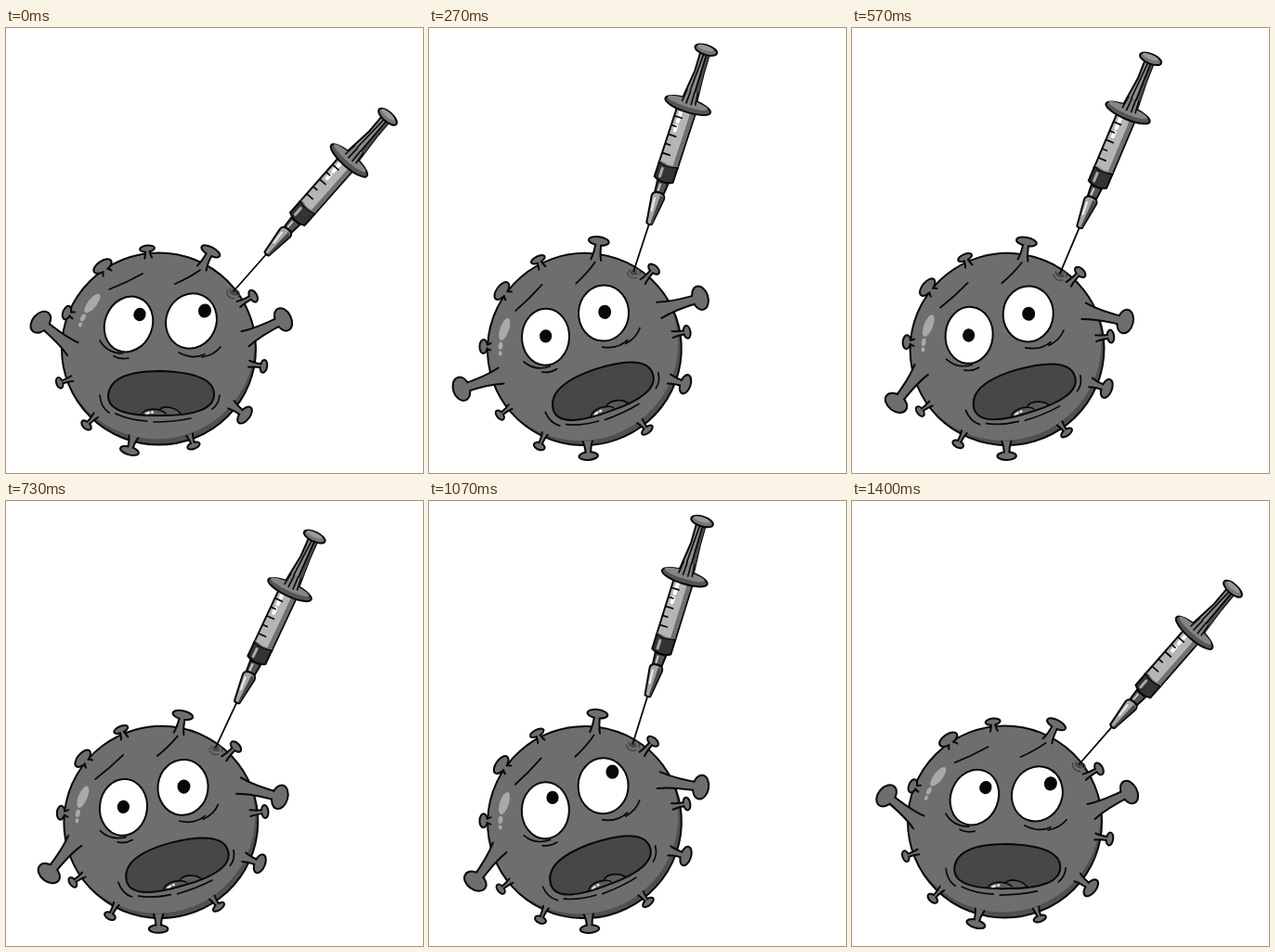
Recreate the animation shown at these times as an HTML page with a canvas. Size 449 by 480 pixels, loop 1.43 s.

```html
<!DOCTYPE html>
<html lang="en">
<head>
<meta charset="utf-8">
<title>Virus and syringe</title>
<style>
  html, body { margin: 0; width: 100%; height: 100%; overflow: hidden; background: #fff; }
  canvas { display: block; }
</style>
</head>
<body>
<canvas id="stage" width="449" height="480"></canvas>
<script>
const ctx = document.getElementById('stage').getContext('2d');
const LOOP = 1430, STEPS = 43, STEP = LOOP / STEPS;
const CX = 164.5, CY = 346;
const SKIN = '#6e6e6e', INK = '#080808';
const rad = deg => deg * Math.PI / 180;

// direction, distance of the head, half width and half thickness of the head
const SPIKES = [
  [-96.6, 108.7, 8, 3.5], [-62, 119, 11, 4.6], [-124.2, 107.6, 11, 5.6],
  [-158.5, 106.4, 7.5, 4.2], [161, 113, 6, 3.4], [133.4, 113.5, 6.3, 3.7],
  [106, 114.4, 10.2, 4.3], [70.3, 111, 7, 3.4], [37.7, 117, 10.5, 5.6],
  [9.5, 114.5, 7, 3.7], [-29.2, 116.5, 7, 4]
];

function ease(x) {
  x = Math.min(1, Math.max(0, x));
  return x * x * x * (10 - 15 * x + 6 * x * x);
}

// Swings out to a peak, relaxes to the middle of the loop, then mirrors back.
function swing(t, peak, middle) {
  const m = Math.min(t, LOOP - t);
  return m < 320 ? peak * ease(m / 320)
                 : peak + (middle - peak) * ease((m - 320) / (LOOP / 2 - 320));
}

function paint(path, fill, stroke = INK, width = 2) {
  if (fill) { ctx.fillStyle = fill; ctx.fill(path); }
  if (stroke) { ctx.strokeStyle = stroke; ctx.lineWidth = width; ctx.stroke(path); }
}

const draw = (d, fill, stroke, width) => paint(new Path2D(d), fill, stroke, width);

function oval(x, y, rx, ry, tilt, fill, stroke, width) {
  const p = new Path2D();
  p.ellipse(x, y, rx, ry, rad(tilt), 0, 7);
  paint(p, fill, stroke, width);
}

function at(x, y, deg, content) {
  ctx.save();
  ctx.translate(x, y);
  ctx.rotate(rad(deg));
  content();
  ctx.restore();
}

// Stem along +x from a to b with a flared root, closed by a knob.
function stalk(a, b, root, neck, rx, ry) {
  const bend = a + (b - a) * 0.35;
  const top = `M${a} ${-root}Q${bend} ${-neck} ${b} ${-neck}`;
  draw(`${top}L${b} ${neck}Q${bend} ${neck} ${a} ${root}Z`, SKIN, null);
  draw(`${top}M${a} ${root}Q${bend} ${neck} ${b} ${neck}`, null);
  oval(b, 0, rx, ry, 0, SKIN);
  draw(`M${b - rx - 2} ${-neck + 1}H${b - rx + 2}V${neck - 1}H${b - rx - 2}Z`, SKIN, null);
}

function shell() {
  const ball = new Path2D();
  ball.ellipse(CX, CY, 104.5, 103.5, 0, 0, 7);
  paint(ball, '#505050', null);
  ctx.save();
  ctx.clip(ball);
  oval(CX - 2, CY - 6, 105, 103.5, 0, SKIN, null);
  ctx.restore();
  paint(ball, null);
}

function face(look) {
  oval(93, 297, 12.5, 4.8, -52, '#a9a9a9', null);
  oval(83, 312.5, 4.2, 2.4, -62, '#a9a9a9', null);
  oval(80, 320, 2.6, 1.9, -70, '#a9a9a9', null);

  draw('M111 282Q129 275 147 265M182 276Q198 269 209 261', null, INK, 1.8);
  draw('M101 337Q109 351 126 351M116 354Q123 358 132 356', null, INK, 1.7);
  draw('M186 350Q201 358 214 352M211 355Q224 353 231 344', null, INK, 1.7);

  oval(132, 319.5, 25.5, 30.5, 22, '#fff');
  oval(199.5, 316, 27, 30, 22, '#fff');
  oval(131.5 + 12.5 * look, 319.5 - 10.5 * look, 6.6, 7.2, 20, INK, null);
  oval(200 + 14 * look, 316 - 11 * look, 7, 7.6, 20, INK, null);

  ctx.save();
  ctx.translate(4 * (1 - look), 0);
  const mouth = new Path2D('M110 397C111 378 132 370 166 370C198 371 223 377 224 394' +
    'C225 411 203 418 169 418C136 419 110 414 110 397Z');
  paint(mouth, '#474747', null);
  ctx.save();
  ctx.clip(mouth);
  draw('M145 419C147 411 158 410 165 412C170 406 185 409 190 419Z', '#5b5b5b', INK, 1.7);
  draw('M164 412Q170 413 172 416', null, INK, 1.4);
  draw('M151 416L154 415M157 414.5H158', null, '#e8e8e8', 2.4);
  ctx.restore();
  paint(mouth, null);
  draw('M101 396Q102 409 111 415M230 396Q229 406 222 411', null, INK, 1.7);
  draw('M118 416Q133 423 152 424M159 425Q181 425 199 421', null, INK, 1.7);
  ctx.restore();
}

function puncture() {
  draw('M238 283Q237 291 246 292M241 281Q240 288 248 288M249 283Q253 286 250 290',
    null, '#424242', 1.3);
  oval(245, 285, 3.5, 2.5, 30, '#4a4a4a', null);
}

// Needle tip at the origin, plunger straight up.
function syringe() {
  draw('M0 0V-57', null, INK, 1.8);

  draw('M-8 -194L-4.5 -226L-5 -247H5L5.5 -226L8 -194Z', '#8b8b8b');
  draw('M2 -195L1 -246H5L5.5 -226L8 -195Z', '#4c4c4c', null);
  draw('M-3 -195L-1 -246M3 -195L2 -246', null, INK, 1.6);
  oval(0, -251, 12.3, 5.2, 0, '#777');
  oval(-1, -253, 9, 2.6, 0, '#999', null);

  draw('M-10.5 -119V-187H10.5V-119Z', '#b5b5b5');
  draw('M5 -120V-186H9.5V-120Z', '#707070', null);
  draw('M-5 -181V-168M-5 -163V-158', null, '#fff', 4);
  let ticks = '';
  for (let i = 0; i < 6; i++) ticks += `M-10 ${-173 + i * 10.5}h${i % 2 ? 5 : 8}`;
  draw(ticks, null, INK, 1.7);

  draw('M-10.5 -121Q0 -117 10.5 -121V-104Q0 -98 -10.5 -104Z', '#333');
  draw('M-10 -122Q0 -118 10 -122', null, '#777', 1.2);
  draw('M-5 -115V-106', null, '#aaa', 3);
  draw('M-6 -101L-5 -89H5L6 -101Z', '#555');
  draw('M-2 -98V-91', null, '#ccc', 2);

  draw('M-3 -54L-7 -84Q-7 -89 0 -89Q7 -89 7 -84L3 -54Q0 -52 -3 -54Z', '#a5a5a5');
  draw('M1 -55L2 -87L6 -85L3 -55Z', '#474747', null);
  draw('M-3 -82L-2 -68', null, '#eee', 2);

  oval(0, -188, 25.5, 7.2, 0, '#555');
  oval(-1, -190.5, 22.5, 4.3, 0, '#858585', null);
  draw('M-7.5 -191L-6 -204H6L7.5 -191Q0 -188 -7.5 -191Z', '#808080', null);
  draw('M-7.5 -191L-6 -204M-2.5 -190L-2 -204M3 -190L2.5 -204M7.5 -191L6 -204', null, INK, 1.6);
}

function render(t) {
  const turn = swing(t, -20.1, -15.6);
  const tilt = swing(t, -24.2, -16.3);
  const lean = -turn / 20;
  const drop = ease((t - 30) / 465) - ease((t - 1000) / 430);
  const look = 1 - ease(t / 340) + ease((t - 650) / 450);

  const body = (dx, dy, content) => at(CX + dx * lean, CY + dy * lean, turn, () => {
    ctx.translate(-CX, -CY);
    content();
  });

  ctx.fillStyle = '#fff';
  ctx.fillRect(0, 0, 449, 480);
  ctx.lineCap = ctx.lineJoin = 'round';

  body(3, 0.5, shell);
  body(0.5, 1.5, () => {
    for (const [angle, dist, wide, thick] of SPIKES)
      at(CX, CY, angle, () => stalk(98.5, dist, wide * 0.5, wide * 0.27, thick, wide));
    at(68, 343, 220 - 76 * drop, () => stalk(-5, 40, 9, 4.5, 9, 13));
    at(262, 333, -27 + 58 * drop, () => stalk(-5, 41, 9, 4.5, 8.5, 13));
    face(look);
    puncture();
  });

  const a = rad(turn), dx = 80.5, dy = -62;
  at(CX + 0.5 * lean + dx * Math.cos(a) - dy * Math.sin(a),
     CY + 1.5 * lean + dx * Math.sin(a) + dy * Math.cos(a),
     41.4 + tilt, syringe);
}

function tick() {
  const step = Math.min(STEPS - 1, Math.floor((performance.now() % LOOP + 4) / STEP));
  render(step * STEP);
  requestAnimationFrame(tick);
}
tick();
</script>
</body>
</html>
```
